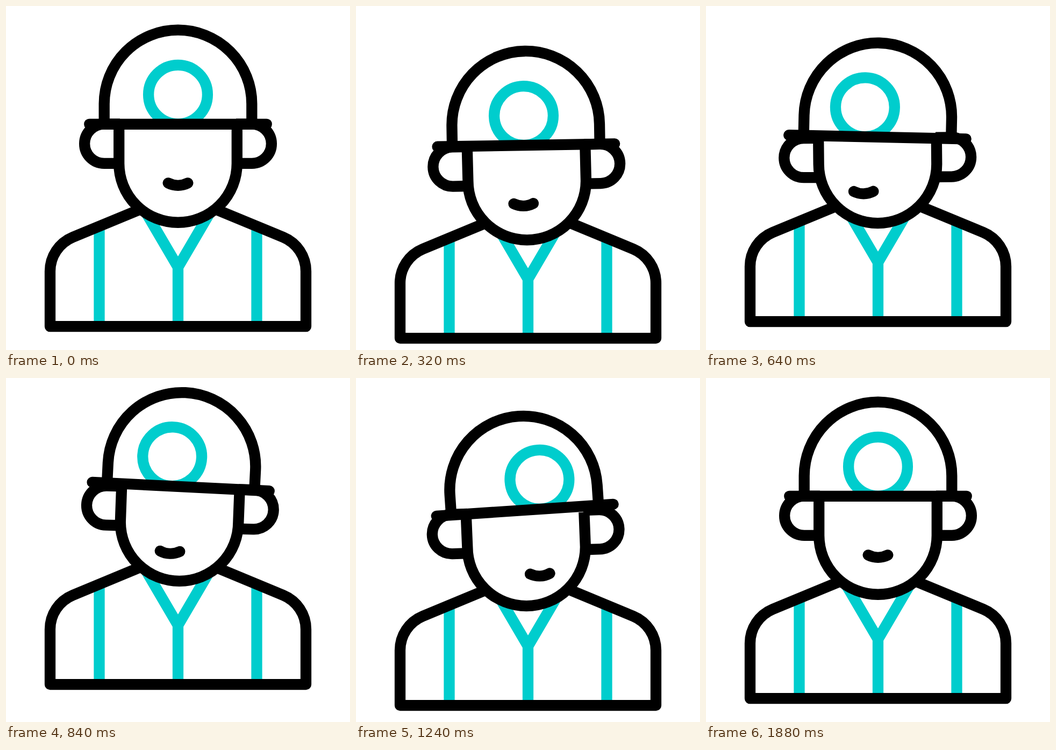
These frames come from a looping animation (640x640 px, 2.24 s). An HTML page:

```html
<!DOCTYPE html>
<html lang="en">
<head>
<meta charset="utf-8">
<title>Worker</title>
<style>
  html, body { margin: 0; width: 100%; height: 100%; overflow: hidden; background: #fff; }
  svg { display: block; width: 100vw; height: 100vh; }
  .line { fill: none; stroke: #000; stroke-width: 20.3; stroke-linejoin: round; }
  .teal { stroke: #00cdcd; stroke-linejoin: miter; }
  .round { stroke-linecap: round; }
  .skin { fill: #fff; }
</style>
</head>
<body>
<svg viewBox="0 0 640 640">
  <clipPath id="aboveBrim"><rect x="100" y="0" width="440" height="220"/></clipPath>
  <g id="body">
    <path class="line teal" d="M173.5 410V596M466.5 410V596M257.5 379.4L320 486L382.5 379.4M320 484V596"/>
    <path class="line" d="M252 377.3L124.3 430.2A68.6 68.6 0 0 0 82 493.6V596.2H558V493.6A68.6 68.6 0 0 0 515.7 430.2L388 377.3"/>
  </g>
  <g id="ears">
    <path class="line" d="M212 219.6H182.7a36.6 36.6 0 0 0 0 73.2H212M428 219.6H457.3a36.6 36.6 0 0 1 0 73.2H428"/>
  </g>
  <path id="face" class="line skin"/>
  <path id="mouth" class="line round" d="M301.7 329.4c11.5 5.8 25.1 5.8 36.6 0"/>
  <g id="helmet">
    <g clip-path="url(#aboveBrim)">
      <circle id="lamp" class="line teal" cx="320" cy="164.7" r="54.9"/>
    </g>
    <path class="line" d="M182.7 219.6V182a137.3 137.3 0 0 1 274.6 0V219.6"/>
    <path class="line round" d="M155.2 219.8H484.8"/>
  </g>
</svg>
<script>
const LOOP = 2240, STEP = 40;

const part = id => document.getElementById(id);
const move = (id, x, y, turn = 0, pivotY = 0) =>
  part(id).setAttribute("transform", `translate(${x} ${y}) rotate(${turn} 320 ${pivotY})`);

const ease = p => p * p * (3 - 2 * p);

// Eases from rest through evenly spaced peaks and back to rest.
function swing(time, delay, span, ...peaks) {
  const beat = Math.max(0, (time - delay) / span);
  const i = Math.floor(beat);
  const from = peaks[i - 1] ?? 0, to = peaks[i] ?? 0;
  return from + (to - from) * ease(beat - i);
}

// The sides hang from the ears while the chin moves on its own.
function faceShape(earX, earY, tilt, chinX, chinY) {
  const a = tilt * Math.PI / 180, r = 109.8, rise = 33;
  const top = side => {
    const x = 320 + earX + side * r * Math.cos(a) + rise * Math.sin(a);
    const y = 256.2 + earY + side * r * Math.sin(a) - rise * Math.cos(a);
    return `${x} ${y}`;
  };
  const x = 320 + chinX, y = 293 + chinY;
  return `M${top(-1)}L${x - r} ${y}A${r} ${r} 0 0 0 ${x + r} ${y}L${top(1)}`;
}

function draw(time) {
  const body = swing(time, 0, 400, 24.5, -27.2, 13.3);
  const helmet = swing(time, 30, 428, 52, -20, 30);
  const ears = swing(time, 30, 428, 53, -17.5, 34);
  const chin = body + swing(time, 60, 415, 15.5, 0.5, 9);
  const mouth = body + swing(time, 90, 405, 27, 18.5, 22);
  const tilt = swing(time, 50, 415, -1.6, 1.7, -2);
  const lampTurn = swing(time, 200, 523, -26, 31);
  const mouthTurn = swing(time, 150, 545, -27, 25.5);

  move("body", 0, body);
  move("ears", 2.4 * tilt, ears, tilt, 256.2);
  move("mouth", mouthTurn + 1.8 * tilt, mouth, tilt, 329.4);
  move("helmet", 3.2 * tilt, helmet, tilt - 0.065 * lampTurn, 219.6);
  move("lamp", lampTurn, 0);
  part("face").setAttribute("d", faceShape(2.4 * tilt, ears, tilt, 1.6 * tilt, chin));
}

const start = performance.now();
function tick() {
  const time = (performance.now() - start) % LOOP;
  draw(Math.floor(time / STEP) * STEP);
  requestAnimationFrame(tick);
}
tick();
</script>
</body>
</html>
```
